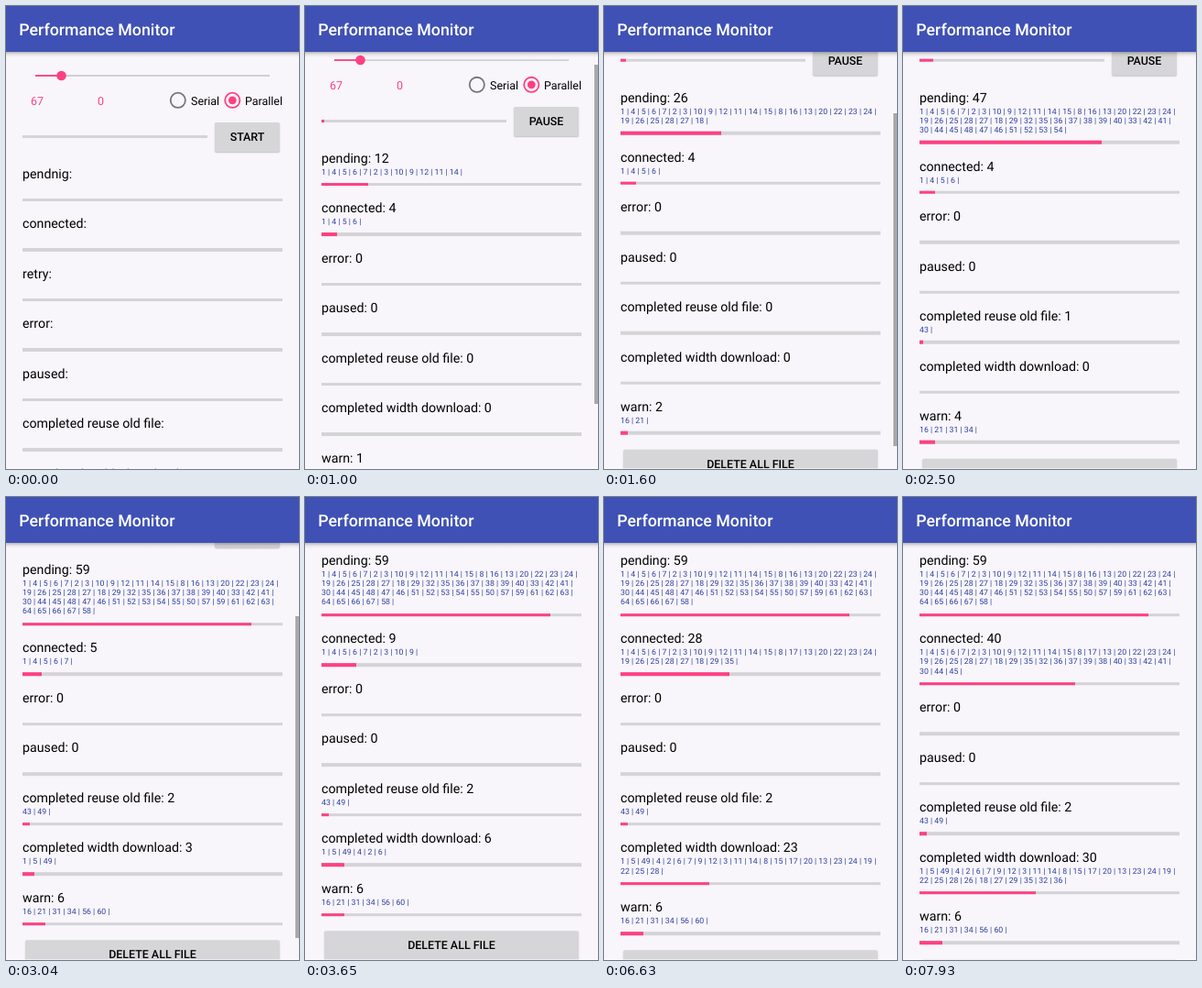
An HTML page that plays this animation: 320x505 px, repeating every 7990 ms.

```html
<!DOCTYPE html>
<html lang="en">
<head>
<meta charset="utf-8">
<title>Performance Monitor</title>
<style>
  :root { --pink: #ff4081; --track: #d4d3d6; --button: #d6d5d7; }
  html, body { margin: 0; width: 100%; height: 100%; overflow: hidden; }
  body { background: #f8f6fa; }
  #stage {
    position: relative; width: 320px; height: 505px; overflow: hidden;
    background: #f8f6fa; color: #000;
    font: 14.22px Roboto, "Open Sans", sans-serif;
    text-rendering: geometricPrecision;
  }
  #stage::after {
    content: ""; position: absolute; inset: 504px 0 0; background: rgba(255, 255, 255, .6);
  }
  header {
    position: absolute; inset: 0 0 auto; height: 50px; padding-left: 14.2px;
    background: #3f51b5; color: #fff; font-size: 17.78px; font-weight: 500; line-height: 54px;
  }
  header::after {
    content: ""; position: absolute; left: 0; top: 50px; width: 100%; height: 6px;
    background: linear-gradient(rgba(0, 0, 0, .28), rgba(0, 0, 0, .08) 45%, transparent);
  }
  #content { position: absolute; inset: 0; }
  #controls { position: absolute; left: 0; top: 0; }
  #controls text { font-size: 12.44px; }
  #controls .pink { fill: var(--pink); }
  .bar { height: 3.6px; background: var(--track); }
  .bar i { display: block; height: 100%; width: 0; background: var(--pink); }
  #total { position: absolute; left: 18px; top: 140.8px; width: 202px; }
  .button {
    box-sizing: border-box; height: 32px; border-radius: 1.8px; text-align: center;
    background: var(--button); box-shadow: 0 1px 1.5px rgba(0, 0, 0, .22);
    font-size: 12.44px; font-weight: 500; line-height: 33.5px;
  }
  #toggle { position: absolute; left: 228px; top: 127px; width: 71px; }
  #list { position: absolute; left: 18px; top: 175.8px; width: 284px; }
  .row { padding-bottom: 16.95px; }
  .label { height: 16.4px; line-height: 16.4px; white-space: nowrap; }
  .ids {
    min-height: 10.25px; margin: 1.55px 0 5.8px;
    color: #303f9f; font-size: 8.74px; line-height: 10.25px;
  }
  #delete { margin: -1.05px 3px 0; }
  #thumb { position: absolute; right: 0; width: 3.6px; background: #a9a8ab; }
</style>
</head>
<body>
<div id="stage">
  <div id="content">
    <svg id="controls" width="320" height="125">
      <path d="M32 76H288" stroke="#d0cfd2" stroke-width="1.8"/>
      <path d="M32 76H60" stroke="#ff4081" stroke-width="1.8"/>
      <circle class="pink" cx="60.5" cy="76" r="5.3"/>
      <text class="pink" x="27" y="107.5">67</text>
      <text class="pink" x="100" y="107.5">0</text>
      <g fill="none" stroke-width="1.8">
        <circle cx="187.8" cy="102.8" r="8.1" stroke="#757575"/>
        <circle cx="247.3" cy="102.8" r="8.1" stroke="#ff4081"/>
      </g>
      <circle class="pink" cx="247.3" cy="102.8" r="4.4"/>
      <text x="202" y="107.5">Serial</text>
      <text x="261" y="107.5">Parallel</text>
    </svg>
    <div id="total" class="bar"><i></i></div>
    <div id="toggle" class="button">START</div>
    <div id="list"><div id="delete" class="button">DELETE ALL FILE</div></div>
  </div>
  <div id="thumb"></div>
  <header>Performance Monitor</header>
</div>
<script>
const LOOP = 7990, START = 460, STEP = 60, TASKS = 67;
const BAR_BOTTOM = 50, VIEW = 454, BASE_HEIGHT = 557, LINE = 10.25;
const $ = id => document.getElementById(id);
const clamp = (v, max = 1) => Math.max(0, Math.min(max, v));

// Linear interpolation through [time, value] points.
function at(points, t) {
  const next = points.findIndex(p => t < p[0]);
  if (next < 0) return points[points.length - 1][1];
  if (next === 0) return points[0][1];
  const [t0, a] = points[next - 1], [t1, b] = points[next];
  return a + (b - a) * (t - t0) / (t1 - t0);
}

// Sine ease-out from 0 to 1.
const glide = (t, from, to) => Math.sin(clamp((t - from) / (to - from)) * Math.PI / 2);
// Shown at once, faded out before `to`.
const flash = (t, from, to) => t < from ? 0 : clamp((to - t) / 260);

// Tasks run nearly in order; "a>b,c" means b and c slip back behind a.
function slip(order, moves) {
  const out = [...order];
  for (const move of moves.split(' ')) {
    const [anchor, late] = move.split('>');
    const ids = late.split(',').map(Number);
    ids.forEach(id => out.splice(out.indexOf(id), 1));
    out.splice(out.indexOf(Number(anchor)) + 1, 0, ...ids);
  }
  return out;
}
const without = (order, ...skip) => order.filter(id => !skip.includes(id));

const warned = [16, 21, 31, 34, 56, 60];
const reused = [43, 49];
const ascending = Array.from({ length: TASKS }, (_, i) => i + 1);
const queued = slip(ascending,
  '7>2,3 10>9 12>11 15>8 17>13 24>19 26>25 28>27,18 40>33 42>41,30 48>47,46 55>50 67>58');
const opened = slip(queued, '35>32 39>38');
const finished = slip(opened, '5>49,4,2 12>3 14>8 20>13 19>22 28>26 18>27 40>38 42>33,10');

const queue = t => at([[520, 0], [1240, 19], [1600, 26], [2980, 59]], t);
const work = t => at([[640, 0], [820, 4], [2620, 4], [2980, 5], [4470, 14.4], [4670, 14.4],
  [4890, 18.2], [5110, 18.2], [5860, 26], [6580, 28.5], [7390, 30], [7900, 40.5]], t);

const rows = [
  { name: 'pending', idle: 'pendnig', ids: without(queued, 17, ...warned.slice(1), ...reused), count: queue },
  { name: 'connected', ids: without(opened, ...warned, ...reused), count: work },
  { name: 'retry', idleOnly: true },
  { name: 'error' },
  { name: 'paused' },
  { name: 'completed reuse old file', ids: reused, done: true, count: t => (t - 2080) / 270 },
  { name: 'completed width download', ids: without(finished, ...warned, 41, 43, 44), done: true,
    count: t => Math.min(work(t) - 1.5, (t - 2400) / 180) },
  { name: 'warn', ids: warned, done: true,
    count: t => at([[640, 0], [1180, 2], [1600, 2], [2920, 6]], t) }
];

for (const row of rows) {
  row.el = document.createElement('div');
  row.el.className = 'row';
  row.el.innerHTML = '<div class="label"></div><div class="ids"></div><div class="bar"><i></i></div>';
  [row.label, row.detail, row.bar] = row.el.children;
  row.tokens = (row.ids || []).map(id => id + '\u00a0| ');
  $('list').insertBefore(row.el, $('delete'));
}

const setBar = (bar, n) => bar.firstChild.style.width = n / TASKS * 100 + '%';

function showRow(row, started, t) {
  row.shown = started && row.count ? Math.floor(clamp(row.count(t), row.ids.length)) : 0;
  row.el.hidden = started && !!row.idleOnly;
  row.label.textContent = started ? `${row.name}: ${row.shown}` : `${row.idle || row.name}:`;
  row.detail.textContent = row.tokens.slice(0, row.shown).join('');
  setBar(row.bar, row.shown);
}

function draw(t) {
  const started = t >= START;
  rows.forEach(row => showRow(row, started, t));
  setBar($('total'), rows.reduce((sum, row) => sum + (row.done ? row.shown : 0), 0));
  $('toggle').textContent = started ? 'PAUSE' : 'START';

  const scroll = 83.3 * glide(t, 910, 1600) + 30.5 * glide(t, 2934, 3160);
  $('content').style.transform = `translateY(${-scroll}px)`;

  const extra = rows.reduce((sum, row) => sum + Math.max(0, row.detail.offsetHeight - LINE), 0);
  const ratio = VIEW / (BASE_HEIGHT + extra);
  const thumb = $('thumb').style;
  thumb.top = BAR_BOTTOM + scroll * ratio + 'px';
  thumb.height = VIEW * ratio + 'px';
  thumb.opacity = flash(t, 910, 2080) + flash(t, 2934, 3640) * (t > 2080);
}

const begin = performance.now();
let last;
function tick() {
  const elapsed = (performance.now() - begin) % LOOP;
  // The screen refreshes in fixed steps, in phase with the start.
  const t = START + Math.floor((elapsed - START) / STEP) * STEP;
  if (t !== last) draw(last = t);
  requestAnimationFrame(tick);
}
tick();
</script>
</body>
</html>
```
